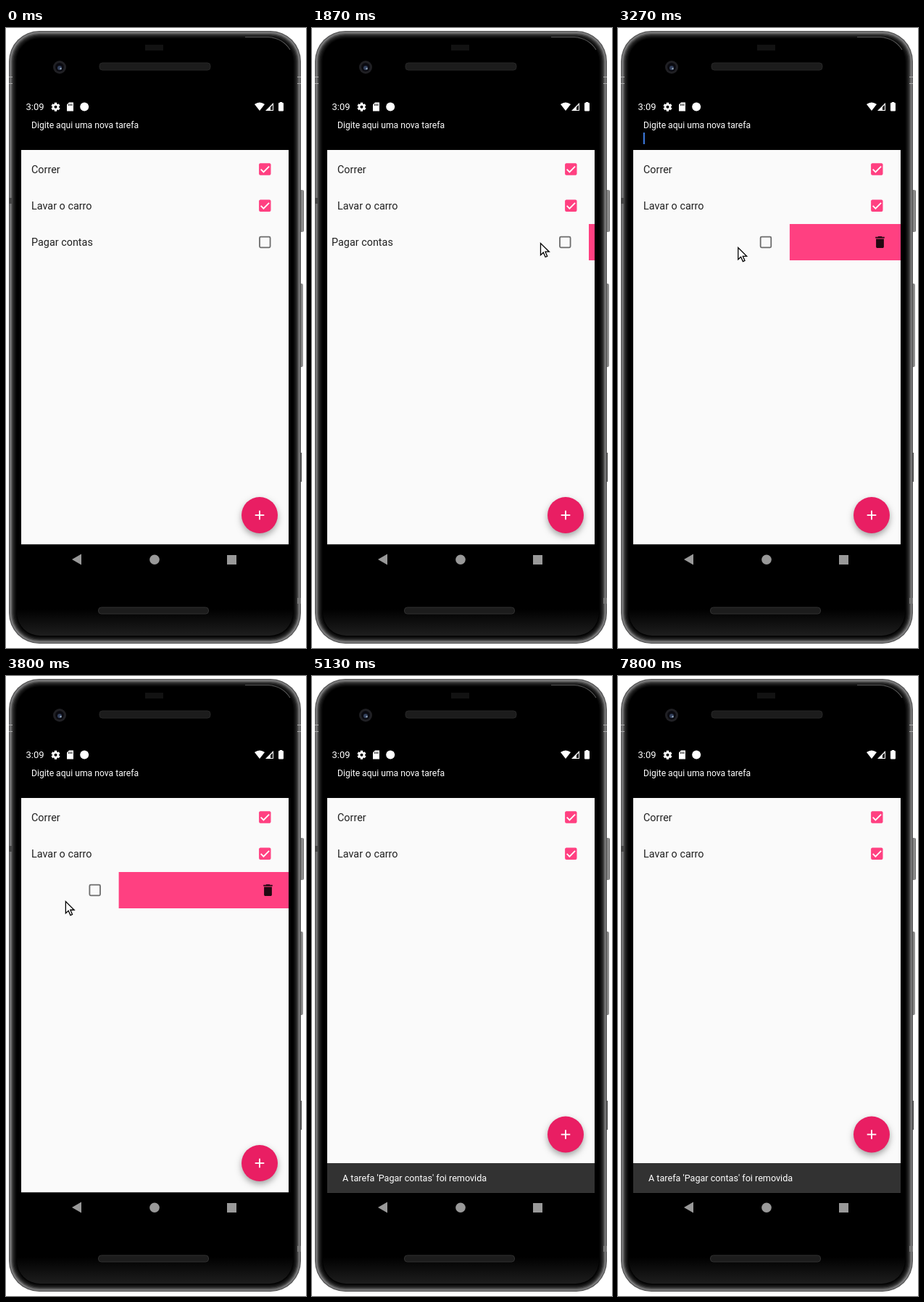
An HTML page with a canvas for the animation above (8000 ms loop, 414x854 px).

```html
<!DOCTYPE html>
<html lang="pt">
<head>
<meta charset="utf-8">
<title>Lista de tarefas</title>
<style>
  html, body { margin: 0; width: 100%; height: 100%; overflow: hidden; background: #fff; }
  canvas { display: block; width: 414px; height: 854px; }
</style>
</head>
<body>
<canvas id="stage"></canvas>
<script>
const W = 414, H = 854, LOOP = 8000;
const ACCENT = '#ff4081', PAPER = '#fafafa', INK = '#212121', PINK = '#e91e63';
const SCREEN = { x: 21, y: 168, w: 369, h: 543.5 };
const ROW_Y = 270, ROW_H = 50;

const canvas = document.getElementById('stage');
const ratio = window.devicePixelRatio || 1;
canvas.width = W * ratio;
canvas.height = H * ratio;
const ctx = canvas.getContext('2d');

const TRASH = new Path2D('M6 19c0 1.1.9 2 2 2h8c1.1 0 2-.9 2-2V7H6v12zM19 4h-3.5l-1-1h-5l-1 1H5v2h14V4z');
const ARROW = new Path2D('M0 0V16.2L3.8 12.7L6.6 19L9.2 17.9L6.5 11.7H11.8Z');

// Pointer keys: time, x, y. Row keys: time, offset.
const POINTER = [[560, 416, 332], [830, 394, 310], [1130, 338, 289], [1300, 338, 289],
  [1870, 315, 296], [2130, 308, 296], [2770, 225, 296], [2930, 219, 297],
  [3800, 82, 310], [4250, 18, 323], [4420, -14, 330]];
const SLIDE = [[1780, 0], [1870, -8], [2130, -13], [2770, -96], [2930, -101],
  [3800, -234.5], [4400, -302], [4590, -302], [4630, -369]];

const clamp = v => Math.min(1, Math.max(0, v));
const span = (t, a, b) => clamp((t - a) / (b - a));

function track(keys, t, col = 1) {
  if (t <= keys[0][0]) return keys[0][col];
  for (let i = 1; i < keys.length; i++) {
    const a = keys[i - 1], b = keys[i];
    if (t <= b[0]) return a[col] + (b[col] - a[col]) * span(t, a[0], b[0]);
  }
  return keys[keys.length - 1][col];
}

function bezier(x1, y1, x2, y2) {
  const at = (a, b, s) => 3 * a * s * (1 - s) ** 2 + 3 * b * s * s * (1 - s) + s ** 3;
  return x => {
    let lo = 0, hi = 1;
    for (let i = 0; i < 18; i++) {
      const mid = (lo + hi) / 2;
      if (at(x1, x2, mid) < x) lo = mid; else hi = mid;
    }
    return at(y1, y2, lo);
  };
}
const fastOutSlowIn = bezier(0.4, 0, 0.2, 1);
const ease = bezier(0.25, 0.1, 0.25, 1);

function rect(x, y, w, h, fill) {
  ctx.fillStyle = fill;
  ctx.fillRect(x, y, w, h);
}

function round(x, y, w, h, r, fill, stroke, width = 1) {
  ctx.beginPath();
  ctx.roundRect(x, y, w, h, r);
  if (fill) { ctx.fillStyle = fill; ctx.fill(); }
  if (stroke) { ctx.strokeStyle = stroke; ctx.lineWidth = width; ctx.stroke(); }
}

function disc(x, y, r, fill) {
  ctx.fillStyle = fill;
  ctx.beginPath();
  ctx.arc(x, y, r, 0, Math.PI * 2);
  ctx.fill();
}

function poly(points, fill) {
  ctx.fillStyle = fill;
  ctx.beginPath();
  points.forEach(([x, y]) => ctx.lineTo(x, y));
  ctx.closePath();
  ctx.fill();
}

function text(str, x, y, size, fill) {
  ctx.font = `${size}px Roboto, sans-serif`;
  ctx.fillStyle = fill;
  ctx.fillText(str, x, y);
}

function gradient(x0, y0, x1, y1, ...stops) {
  const g = ctx.createLinearGradient(x0, y0, x1, y1);
  stops.forEach(([at, color]) => g.addColorStop(at, color));
  return g;
}

function clipped(x, y, w, h, draw) {
  ctx.save();
  ctx.beginPath();
  ctx.rect(x, y, w, h);
  ctx.clip();
  draw();
  ctx.restore();
}

function phone() {
  rect(0, 0, W, H, '#fff');
  const metal = gradient(406, 0, 411, 0, [0, '#555'], [0.6, '#a0a0a0'], [1, '#555']);
  round(405, 223, 6, 58, 2, metal);
  round(405, 352, 5, 115, 2, metal);
  rect(405, 585, 3, 40, '#444');

  // Metal rim fading into the glass
  const rim = ['#555', '#808082', '#666', '#444', '#2c2c2c', '#1c1c1c', '#121212', '#080808', '#000'];
  rim.forEach((color, i) => {
    const inset = i * 1.3;
    round(4 + inset, 4 + inset, 403 - 2 * inset, 844 - 2 * inset, 42 - inset, color);
  });
  round(15, 790, 381, 47, [0, 0, 32, 32], gradient(0, 800, 0, 837, [0, '#000'], [1, '#1e1e1e']));
  for (const y of [67, 76]) {
    rect(4, y, 5, 1, '#aaa');
    rect(402, y, 5, 1, '#aaa');
  }
  rect(4, 234, 4, 8, '#444');
  rect(402, 785, 5, 8, '#777');

  ctx.strokeStyle = '#555';
  ctx.lineWidth = 1.2;
  ctx.beginPath();
  ctx.moveTo(330, 12.5);
  ctx.lineTo(362, 12.5);
  ctx.quadraticCurveTo(382, 14, 392, 30);
  ctx.stroke();

  rect(192, 23, 25, 8, '#121212');
  round(129, 48, 153, 10, 4, '#1c1c1c', '#262626');
  round(127.5, 798, 152, 9, 4, '#1c1c1c', '#303030');
  disc(74, 54, 9, '#202024');
  disc(74, 54, 6, '#0a0a10');
  disc(74, 55, 3, '#33405c');
  disc(75.5, 56, 1.2, '#99aabb');
  rect(SCREEN.x, 90, SCREEN.w, 668, '#000');
}

function gear(x, y) {
  ctx.save();
  ctx.translate(x, y);
  for (let i = 0; i < 6; i++) {
    ctx.rotate(Math.PI / 3);
    rect(-1.7, -6, 3.4, 4, '#fff');
  }
  disc(0, 0, 4.5, '#fff');
  disc(0, 0, 2, '#000');
  ctx.restore();
}

function statusBar() {
  text('3:09', 27.5, 113.3, 13, '#fff');
  gear(68.5, 108.7);
  poly([[87, 102.5], [93, 102.5], [93, 114.5], [84, 114.5], [84, 105.5]], '#fff');
  for (let i = 0; i < 3; i++) rect(86.2 + i * 2.1, 104.5, 1, 2.6, '#000');
  disc(108.2, 108.5, 6, '#fff');

  ctx.fillStyle = '#fff';
  ctx.beginPath();
  ctx.moveTo(350, 114);
  ctx.lineTo(343, 105);
  ctx.quadraticCurveTo(350, 100, 357, 105);
  ctx.fill();
  poly([[358, 114], [369, 103], [369, 114]], '#fff');
  poly([[365, 109], [368, 106], [368, 113], [365, 113]], '#000');
  rect(377.8, 102, 3.4, 2, '#fff');
  round(376, 103, 7, 11.5, 1, '#fff');
}

function header(t) {
  statusBar();
  text('Digite aqui uma nova tarefa', 35, 138, 12.15, '#fff');
  if ((t - 268 + LOOP) % 1000 < 500) rect(35, 144, 1.8, 16, '#4285f4');
}

function checkbox(x, y, checked) {
  if (!checked) return round(x - 7.3, y - 7.3, 14.6, 14.6, 1.5, null, '#6c6c6c', 1.8);
  round(x - 8.2, y - 8.2, 16.4, 16.4, 2, ACCENT);
  ctx.strokeStyle = '#fff';
  ctx.lineWidth = 1.8;
  ctx.beginPath();
  ctx.moveTo(x - 5.6, y + 0.2);
  ctx.lineTo(x - 1.9, y + 3.9);
  ctx.lineTo(x + 5.8, y - 3.9);
  ctx.stroke();
}

function task(label, y, checked, dx = 0) {
  text(label, 35 + dx, y + 5, 14.4, INK);
  checkbox(357.3 + dx, y, checked);
}

function slidingTask(t) {
  const dx = track(SLIDE, t);
  const height = ROW_H * (1 - ease(span(t, 4750, 4920)));
  if (dx > -369) task('Pagar contas', 295, false, dx);
  if (dx === 0 || height <= 0) return;
  clipped(390 + dx, ROW_Y, -dx, height, () => {
    rect(390 + dx, ROW_Y, -dx, height, ACCENT);
    ctx.translate(361.5 - 10.8, ROW_Y + height / 2 - 10.8);
    ctx.scale(0.9, 0.9);
    ctx.fillStyle = '#220811';
    ctx.fill(TRASH);
  });
}

function fab(y) {
  ctx.save();
  ctx.shadowColor = 'rgba(0,0,0,.35)';
  ctx.shadowBlur = 8 * ratio;
  ctx.shadowOffsetY = 4 * ratio;
  disc(350, y, 25, PINK);
  ctx.restore();
  rect(343.7, y - 0.9, 12.6, 1.8, '#fff');
  rect(349.1, y - 6.3, 1.8, 12.6, '#fff');
}

function app(t) {
  const { x, y, w, h } = SCREEN;
  const rise = fastOutSlowIn(span(t, 4890, 5140));
  clipped(x, y, w, h, () => {
    rect(x, y, w, h, PAPER);
    task('Correr', 194.5, true);
    task('Lavar o carro', 244.7, true);
    slidingTask(t);
    fab(671 - 39.5 * rise);
    const top = y + h - 40.5 * rise;
    rect(x, top, w, 41, '#323232');
    ctx.globalAlpha = span(t, 5010, 5110);
    text("A tarefa 'Pagar contas' foi removida", 42, top + 24.5, 12.6, '#fff');
    ctx.globalAlpha = 1;
  });
}

function navBar() {
  const color = '#999';
  poly([[91, 732], [104, 724.5], [104, 739.5]], color);
  disc(205, 732.3, 6.8, color);
  rect(305, 726, 13, 13, color);
}

function pointer(t) {
  if (t < 560 || t > 4420) return;
  ctx.save();
  ctx.translate(track(POINTER, t, 1) + 0.5, track(POINTER, t, 2) + 0.5);
  ctx.fillStyle = '#fff';
  ctx.strokeStyle = '#000';
  ctx.lineWidth = 1.3;
  ctx.fill(ARROW);
  ctx.stroke(ARROW);
  ctx.restore();
}

function render(t) {
  ctx.setTransform(ratio, 0, 0, ratio, 0, 0);
  phone();
  header(t);
  app(t);
  navBar();
  pointer(t);
}

const start = performance.now();
function tick() {
  render((performance.now() - start) % LOOP);
  requestAnimationFrame(tick);
}
tick();
</script>
</body>
</html>
```
